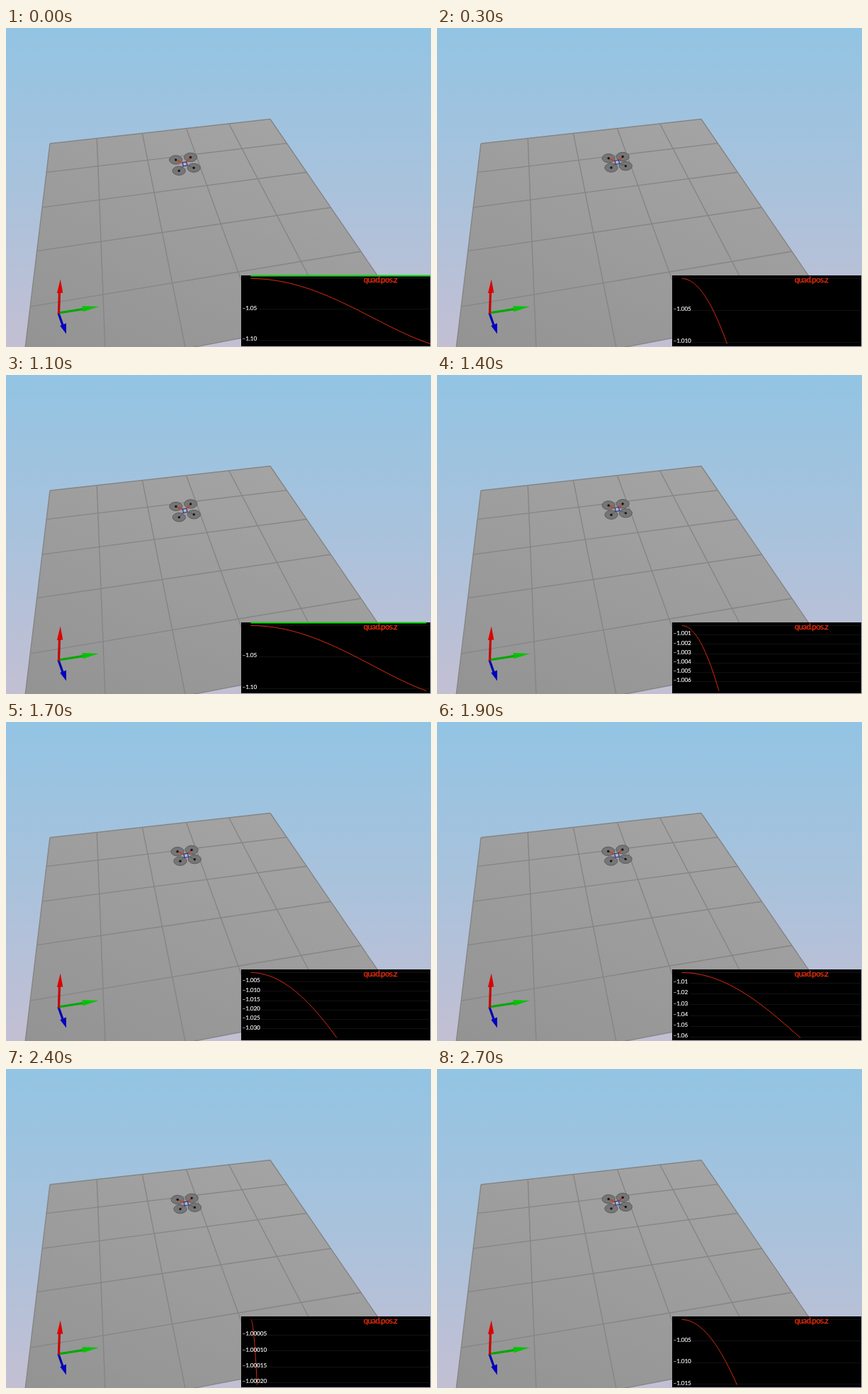
Recreate the animation shown at these times as an HTML page. Size 600 by 450 pixels, loop 2.8 s.

```html
<!DOCTYPE html>
<html lang="en">
<head>
<meta charset="utf-8">
<title>Quadrotor height</title>
<style>
  html, body { margin: 0; width: 100%; height: 100%; overflow: hidden; }
  svg { display: block; width: 600px; height: 450px; }
  text { font-family: Lato, sans-serif; }
  #labels { fill: #fff; font-size: 8.3px; letter-spacing: -.15px; stroke: #fff; stroke-width: .15; }
  #title { fill: #f5300c; font-size: 11.4px; letter-spacing: -.58px; stroke: #f5300c; stroke-width: .25; }
  #grid { fill: none; stroke: #858585; stroke-width: 1.4; }
  #ticks { stroke: #121212; }
  #curve { fill: none; stroke: #dc2c10; }
  #rotors { fill: #767676; stroke: #555; stroke-width: .9; }
  #axes path { stroke-width: 3.2; }
</style>
</head>
<body>
<svg viewBox="0 0 600 450">
  <defs>
    <linearGradient id="sky" x2="0" y2="1">
      <stop stop-color="#92c4e3"/>
      <stop offset=".5" stop-color="#a9c2dc"/>
      <stop offset="1" stop-color="#c3bfd3"/>
    </linearGradient>
    <linearGradient id="floor" x1=".8" y1="0" x2=".2" y2="1">
      <stop stop-color="#a5a5a5"/>
      <stop offset="1" stop-color="#939393"/>
    </linearGradient>
    <clipPath id="frame"><rect x="332" y="348" width="267" height="101"/></clipPath>
  </defs>
  <rect width="600" height="450" fill="url(#sky)"/>
  <path id="ground" fill="url(#floor)"/>
  <path id="grid"/>

  <g id="axes">
    <path d="M74 402L80 419" stroke="#0000b0"/>
    <path d="M76.3 420L85 416.5L85 431.5Z" fill="#0000c0"/>
    <path d="M74 402L110 396.3" stroke="#00a800"/>
    <path d="M107.5 392.3L108.5 400.3L131 393Z" fill="#00c400"/>
    <path d="M74.5 403L75.5 373" stroke="#c80000"/>
    <path d="M72 374L80.3 373.5L76.8 354.5Z" fill="#dc0000"/>
  </g>

  <g id="drone">
    <g id="rotors"></g>
    <path id="rearArms" stroke="#55557e" stroke-width="1"/>
    <path id="frontArms" stroke="#cc3c1c" stroke-width="1.6"/>
    <g id="motors" fill="#14141e"></g>
    <path d="M-3 -2.2L2.2 -3L3.4 2.2L-2 3Z" fill="#aab4d0" stroke="#24307c" stroke-width="1.1"/>
  </g>

  <rect x="332" y="349" width="267" height="100"/>
  <g clip-path="url(#frame)">
    <path id="ticks"/>
    <path id="goal" stroke="#00dc00" stroke-width="2"/>
    <path id="curve"/>
    <g id="labels"></g>
    <text id="title" x="504.8" y="359.4">quad.pos.z</text>
  </g>
</svg>
<script>
const $ = id => document.getElementById(id);
const LOOP = 2800, STEP = 100;
const X0 = 345.5, Y0 = 353.5, HEIGHT = 92, PX_PER_STEP = 23, LAST = 11.04;

function add(parent, tag, attrs) {
  const el = document.createElementNS("http://www.w3.org/2000/svg", tag);
  for (const k in attrs) el.setAttribute(k, attrs[k]);
  return parent.appendChild(el);
}

// Perspective map from the unit square to corners a (0,0), b (1,0), c (1,1), d (0,1)
function perspective(a, b, c, d) {
  const [dx1, dy1] = [b[0] - c[0], b[1] - c[1]];
  const [dx2, dy2] = [d[0] - c[0], d[1] - c[1]];
  const [sx, sy] = [0, 1].map(i => a[i] - b[i] + c[i] - d[i]);
  const det = dx1 * dy2 - dx2 * dy1;
  const g = (sx * dy2 - dx2 * sy) / det;
  const h = (dx1 * sy - sx * dy1) / det;
  return (u, v) => [0, 1].map(i =>
    ((b[i] * (1 + g) - a[i]) * u + (d[i] * (1 + h) - a[i]) * v + a[i]) / (g * u + h * v + 1));
}

function drawFloor() {
  const corners = [[62, 163], [373, 128.5], [555.4, 394.5], [21.6, 497]];
  const at = perspective(...corners);
  let d = "";
  for (let i = 0; i <= 5; i++) {
    const k = i / 5;
    d += `M${at(k, 0)}L${at(k, 1)}M${at(0, k)}L${at(1, k)}`;
  }
  $("grid").setAttribute("d", d);
  $("ground").setAttribute("d", `M${corners.join("L")}Z`);
}

const drop = p => .00136 * p * p * (1 - .00295 * p * p);

// Steps since the current run began
function progress(t) {
  if (t < 100) return LAST;
  const start = t < 1200 ? 22 : t < 2400 ? 1172 : 2361;
  return Math.min(LAST, (t - start) / 100);
}

const discs = [], motors = [];
for (let i = 0; i < 4; i++) {
  discs.push(add($("rotors"), "ellipse", { rx: 9.1, ry: 6.2 }));
  motors.push(add($("motors"), "circle", { r: 1.7 }));
}

function drawDrone(p) {
  const q = (p / 11) ** 4;
  const x = 254.2 - 1.8 * q, y = 189.8 - 55 * drop(p) + 7.8 * q;
  const arms = [
    [-12 - .7 * q, -5.5 - .4 * q],
    [8 + .2 * q, -7.7 - 1.8 * q],
    [-8.2, 7.8 + 1.7 * q],
    [12.2 + .6 * q, 5.4]
  ];
  $("drone").setAttribute("transform", `translate(${x} ${y})`);
  arms.forEach(([cx, cy], i) => {
    for (const el of [discs[i], motors[i]]) {
      el.setAttribute("cx", cx);
      el.setAttribute("cy", cy);
    }
  });
  $("frontArms").setAttribute("d", `M0 0L${arms[0]}M0 0L${arms[1]}`);
  $("rearArms").setAttribute("d", `M0 0L${arms[2]}M0 0L${arms[3]}`);
}

function tickStep(range) {
  const unit = 10 ** Math.floor(Math.log10(range));
  const m = range / unit;
  return unit * (m < 3.8 ? .5 : m < 7.6 ? 1 : 2);
}

function drawChart(p) {
  const range = drop(p), scale = HEIGHT / range;
  const endX = X0 + p * PX_PER_STEP;

  const points = [];
  for (let i = 0; i <= 60; i++) {
    const s = p * i / 60;
    points.push([X0 + s * PX_PER_STEP, Y0 + drop(s) * scale]);
  }
  $("curve").setAttribute("d", `M${points.join("L")}`);

  const goalY = Y0 - .0045 * scale;
  $("goal").setAttribute("d", `M${X0} ${goalY}H${endX}`);

  const step = tickStep(range);
  const digits = Math.max(2, -Math.floor(Math.log10(step) + 1e-9));
  let lines = `M${X0} ${Y0}H597`;
  $("labels").textContent = "";
  for (let v = step; v <= range; v += step) {
    const y = Y0 + v * scale;
    lines += `M${X0 + 12} ${Math.floor(y) + .5}H597`;
    add($("labels"), "text", { x: 333.6, y: y + .7 }).textContent = "−" + (1 + v).toFixed(digits);
  }
  $("ticks").setAttribute("d", lines);
}

let shown = -1;
function tick(now) {
  const t = Math.floor(now % LOOP / STEP) * STEP;
  if (t !== shown) {
    shown = t;
    const p = progress(t);
    drawDrone(p);
    drawChart(p);
  }
  requestAnimationFrame(() => tick(performance.now() - began));
}

drawFloor();
const began = performance.now();
tick(0);
</script>
</body>
</html>
```
